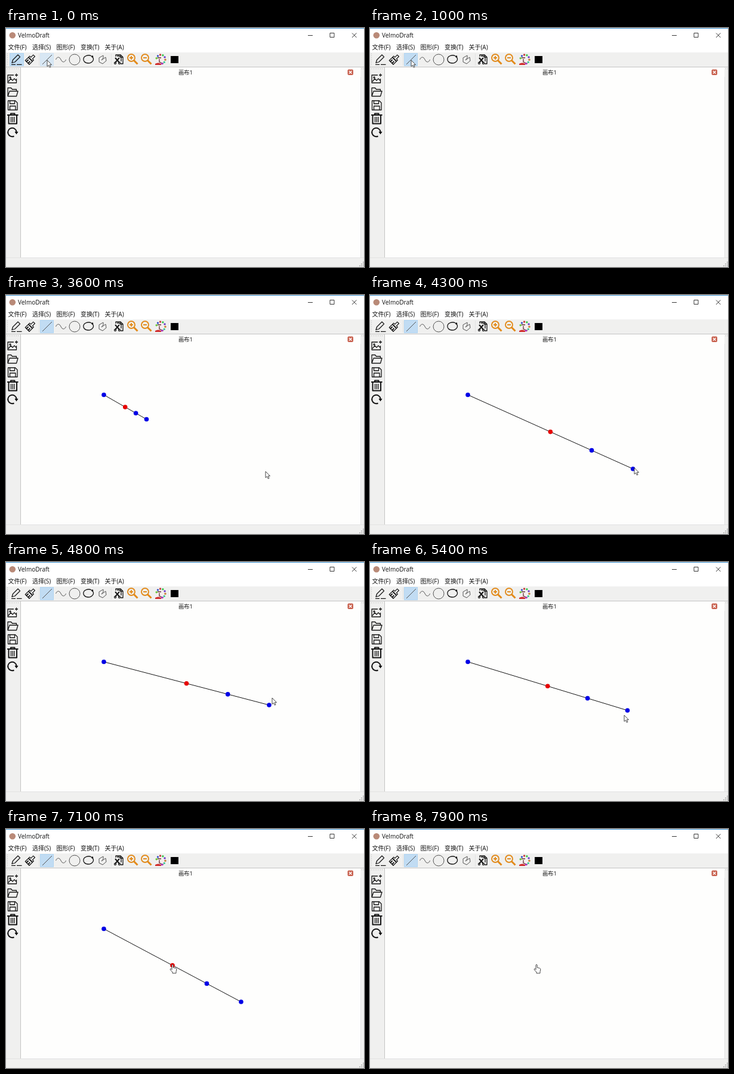
These frames come from a looping animation (600 px wide and 401 px high, 8000 ms). An HTML page:

```html
<!DOCTYPE html>
<html lang="zh">
<head>
<meta charset="utf-8">
<title>Drawing a line</title>
<style>
html, body { margin: 0; width: 100%; height: 100%; overflow: hidden; background: #fff; }
svg { display: block; width: 600px; height: 401px; }
text { font: 10px "Open Sans", "Noto Sans CJK SC", "Noto Sans CJK", sans-serif; fill: #111; }
.ink, .thin, .zoom, .edge, .dots { fill: none; }
.ink { stroke: #151515; stroke-width: 1.3; stroke-linejoin: round; }
.thin { stroke: #555; }
.zoom { stroke: #e28a1a; stroke-width: 1.9; }
.bold { stroke-width: 2; }
.handle { stroke-width: 3; }
.edge { stroke: #c4c4c4; }
.faint { stroke: #e2e2e2; }
.dots { stroke: #b8b8b8; stroke-dasharray: 1 2; }
.key { fill: #c1dcf3; stroke: #b0d4f2; }
.hover { fill: #d8e7f4; stroke: #d0e3f3; }
.cursor { fill: #fff; stroke: #333; stroke-width: .9; }
</style>
</head>
<body>
<svg viewBox="0 0 600 401">
  <!-- window -->
  <rect width="600" height="401" fill="#fff"/>
  <rect width="600" height="1" fill="#3c93d2"/>
  <circle cx="10.8" cy="12.2" r="5.3" fill="#b98a78"/>
  <text x="20" y="16">VelmoDraft</text>
  <path d="M506 12.5h8M543 8.5h7v7h-7zM580 8.5l7.5 7.5M587.5 8.5l-7.5 7.5" fill="none" stroke="#222" stroke-width=".9"/>
  <g id="menu"></g>

  <!-- panels -->
  <rect y="41" width="600" height="360" fill="#f0f0ef"/>
  <rect x="25" y="66" width="569" height="319" fill="#fefefd"/>
  <path class="edge" d="M0 65.5H600M24.5 66V385"/>
  <path class="edge faint" d="M594.5 82V385M0 385.5H600M55.5 43v20M176.5 43v20"/>
  <path class="dots" d="M2.5 43v20M2 68.5h21M596 68.5h4"/>
  <g id="grip" fill="#bcbcbc"></g>
  <text x="289" y="78" style="font-size:9.3px">画布1</text>
  <rect x="572.5" y="69.5" width="9.5" height="9.5" rx="2" fill="#c8604e"/>
  <path d="M575 72l4.5 4.5M579.5 72l-4.5 4.5" stroke="#fff" stroke-width="1.5"/>

  <!-- toolbar -->
  <rect id="penKey" class="key" x="6.5" y="42.5" width="23" height="21"/>
  <rect id="lineKey" class="key" x="57.5" y="42.5" width="22" height="21"/>
  <path class="ink" d="M10 58.5l1.5-5L20 45l3.500 3.500L15 57zM9 61.3h7M18 61.3h8.500"/>
  <g class="ink" transform="translate(41 52.5) rotate(45) scale(.95)">
    <path d="M-5 0h10v8h-10zM-5 0v-3h3v-6h4v6h3v3"/>
    <path class="bold" d="M-2 8v-5M2 8v-5M-5 0h10"/>
  </g>
  <path class="thin" d="M61 61L77 45M83.500 53c2-5 6-5.500 8.500 0s6.500 5 8.500 0"/>
  <circle class="thin" cx="115" cy="53" r="9"/>
  <path class="ink" d="M145 48.500c4 5-1 10.500-7 10.500s-9-4-8-8 8-7 13-4"/>
  <circle cx="144.700" cy="47.800" r="1.600"/>
  <path class="thin" d="M156 50l7-4v4l-3 4 7-5 1 6-6 5-6-3z"/>
  <path class="ink" d="M184 48v-3h8l4 4v11h-4M186 47h4l3 3v6M192 45v4h4"/>
  <path class="ink bold" d="M183 50l7 8M190 50l-7 8"/>
  <circle class="ink" cx="183" cy="59" r="1.500"/>
  <circle class="ink" cx="190" cy="59" r="1.500"/>
  <g id="lens" class="zoom">
    <circle cx="210" cy="50" r="6"/>
    <path class="handle" d="M214.500 54.500l6 6"/>
    <path d="M207 50h6"/>
  </g>
  <use href="#lens" x="23"/>
  <path class="zoom" d="M210 47v6"/>
  <circle cx="259" cy="53" r="7" fill="#f5eeee"/>
  <path d="M254 50h6M257 52v5l7 3" fill="none" stroke="#603030" stroke-width="1.300"/>
  <path d="M250 60q5-3 10 0v2h-10z" fill="#d02c2c"/>
  <g id="paints"></g>
  <rect x="276" y="47" width="13" height="12"/>

  <!-- side tools -->
  <g class="ink">
    <path d="M13 79H3v13h14.500v-7M4 90l4-5 3 3 3-3 4 4M15 79h5M17.500 76.500v5"/>
    <circle cx="7" cy="83" r="1.100"/>
    <path d="M3 114V100.500h5.500l2 2.500h7v3M3 114.500l3-8.500h14l-2.500 8.500z"/>
    <path d="M3.500 122h12l3.500 3.500v12h-15.500zM6.500 122v5h8v-5M6.500 137v-6h9.500v6"/>
    <path class="bold" d="M2 146h18.500M8 145.500v-2h6.500v2M4.500 146v14.500h13.500V146"/>
    <path d="M8.500 149v9M11.300 149v9M14 149v9"/>
    <path class="bold" d="M13.500 181.500A7.200 7.200 0 1 1 17.500 174"/>
  </g>
  <path d="M14.500 174h6l-3 4.500z"/>

  <!-- drawing -->
  <g id="shape"><line id="stroke" stroke="#111"/></g>
  <path id="arrow" class="cursor" d="M0 0V10.500L2.500 8.400 4.200 12.200 6 11.400 4.300 7.700H7.500Z"/>
  <path id="hand" class="cursor" d="M-1 9V1.200Q0-.8 1.200 1.200V5.500L5.500 6.500Q7 7 6.800 9L6 12.500V15H0V13L-3.800 9Q-4 7-2.500 7.500Z"/>
</svg>
<script>
const SVG = "http://www.w3.org/2000/svg";
const $ = id => document.getElementById(id);

function add(parent, tag, attrs, label = "") {
  const el = document.createElementNS(SVG, tag);
  set(el, attrs);
  el.textContent = label;
  return parent.appendChild(el);
}

function set(el, attrs) {
  for (const key in attrs) el.setAttribute(key, attrs[key]);
}

const show = (el, on) => el.style.display = on ? "" : "none";
const mix = (a, b, f) => a.map((v, i) => v + (b[i] - v) * f);

["文件(F)", "选择(S)", "图形(F)", "变换(T)", "关于(A)"]
  .forEach((label, i) => add($("menu"), "text", { x: 3.4 + i * 40.5, y: 36 }, label));

for (let row = 0; row < 3; row++)
  for (let col = 0; col <= row; col++)
    add($("grip"), "rect", { x: 598 - col * 3, y: 392 + row * 3, width: 2, height: 2 });

for (let i = 0; i < 8; i++) {
  const a = -2.9 + i * .6;
  add($("paints"), "circle", {
    cx: 259.5 + 7.5 * Math.cos(a), cy: 52.5 + 7.5 * Math.sin(a), r: 1.7,
    fill: `hsl(${100 + i * 130} 55% 50%)`
  });
}

// Handles sit at fixed fractions of the line.
const knobs = [0, .75, 1, .5].map(at => ({
  at, el: add($("shape"), "circle", { r: 3.8, fill: at === .5 ? "#e60000" : "#0000e6" })
}));

const LOOP = 8000, STEP = 100, LAG = 200;
const CLICK = 500, PRESS = 3200, RELEASE = 6000, HOVER = 7100, CLEAR = 7700;

// Pointer stops: [time, x, y]. It moves straight between them.
const stops = [
  [1300, 69, 54], [2100, 115, 147], [2500, 164, 167.5], [PRESS, 164, 167.5],
  [3400, 235.5, 208.5], [3600, 435, 296], [4300, 443, 290], [4600, 441, 240],
  [4800, 446, 228], [5200, 431.5, 249], [5400, 426, 257], [RELEASE, 394, 290],
  [6400, 313, 258], [HOVER, 279, 227]
];

function pointer(t) {
  const i = stops.findIndex(s => s[0] > t);
  if (i <= 0) return stops.at(i).slice(1);
  const [from, to] = [stops[i - 1], stops[i]];
  return mix(from, to, (t - from[0]) / (to[0] - from[0])).slice(1);
}

function draw(now) {
  const t = Math.floor(now % LOOP / STEP) * STEP;
  show($("penKey"), t < CLICK);
  set($("lineKey"), { class: t < CLICK ? "hover" : "key" });

  const [x, y] = pointer(t);
  for (const id of ["arrow", "hand"]) set($(id), { transform: `translate(${x} ${y})` });
  show($("arrow"), t < HOVER);
  show($("hand"), t >= HOVER);

  // The line's end trails the pointer until the button is released.
  show($("shape"), t > PRESS && t < CLEAR);
  const start = pointer(PRESS);
  const end = pointer(Math.max(PRESS, Math.min(t - LAG, RELEASE)));
  set($("stroke"), { x1: start[0], y1: start[1], x2: end[0], y2: end[1] });
  for (const { at, el } of knobs) {
    const [cx, cy] = mix(start, end, at);
    set(el, { cx, cy });
  }
}

const began = performance.now();
function tick() {
  draw(performance.now() - began);
  requestAnimationFrame(tick);
}
tick();
</script>
</body>
</html>
```
